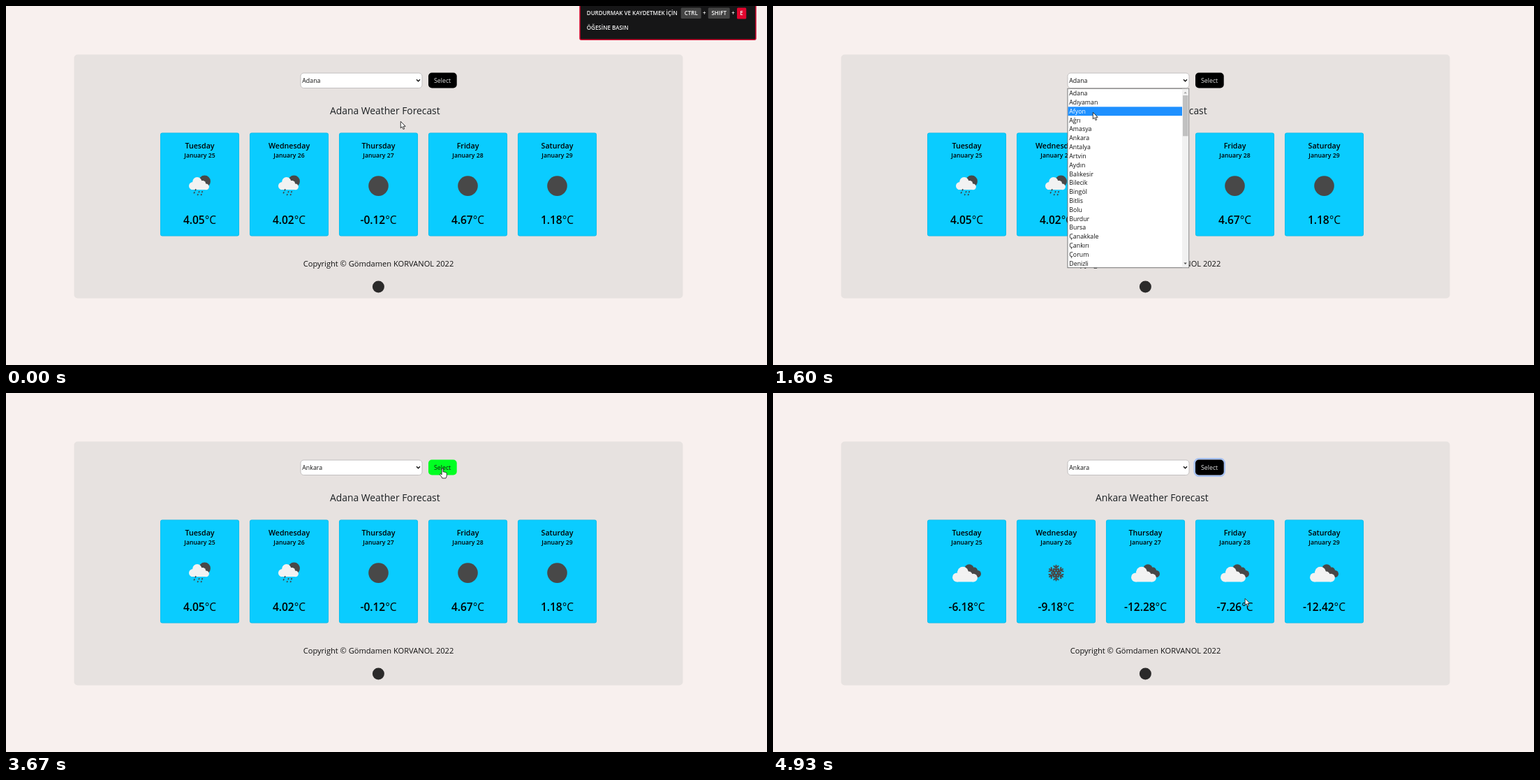
These frames come from a looping animation (1090x514 px, 4990 ms). An HTML page:

```html
<!DOCTYPE html>
<html lang="en">
<head>
<meta charset="utf-8">
<title>Weather Forecast</title>
<style>
  html, body { margin: 0; width: 100%; height: 100%; overflow: hidden; background: #f8f0ee; }
  svg { display: block; width: 1090px; height: 514px; font-family: "Open Sans", "Noto Sans", sans-serif; }
  .mid { text-anchor: middle; }
  .ui { font-size: 8.8px; fill: #111; }
  .heading { font-size: 13.85px; fill: #1c2023; }
  .day { font-size: 10.65px; font-weight: 600; }
  .date { font-size: 8.7px; font-weight: 600; }
  .temp { font-size: 15.5px; font-weight: 600; }
  .temp tspan { font-weight: 400; }
  .footer { font-size: 11.1px; fill: #111; }
  .notice { font-size: 8px; font-weight: 600; fill: #f4f4f4; }
</style>
</head>
<body>
<svg id="stage" viewBox="0 0 1090 514" xmlns="http://www.w3.org/2000/svg">
  <defs>
    <g id="moon"><circle r="14.3" fill="#484848"/></g>
    <g id="rain">
      <circle cx="7" cy="-6.6" r="8.4" fill="#484848"/>
      <g fill="#f2f2f2">
        <circle cx="-10" cy="0" r="5.5"/>
        <circle cx="-3.7" cy="-6" r="6.6"/>
        <circle cx="4" cy="-3" r="4.6"/>
        <circle cx="9" cy="1.2" r="4.4"/>
        <rect x="-13" y="-3" width="22" height="8.5" rx="2"/>
      </g>
      <path d="M-5.5 4.5l-1 2.2M-.5 7.5l-1 2M4 7.5l-1 2M-7.3 8.5l-1 2.2M-2.3 11.5l-.9 2M2.7 11.5l-.9 2" stroke="#3f464a" stroke-width="1.6"/>
    </g>
    <g id="clouds">
      <g fill="#484848">
        <circle cx="3.5" cy="-5.5" r="6.8"/>
        <circle cx="10.7" cy="-3.2" r="4.8"/>
        <circle cx="15.3" cy="1.3" r="5.2"/>
        <rect x="2" y="-4" width="13" height="10.5"/>
      </g>
      <g fill="#f2f2f2">
        <circle cx="-14" cy="6.3" r="6.5"/>
        <circle cx="-5.5" cy="-.8" r="8"/>
        <circle cx="3" cy="3" r="5"/>
        <circle cx="9.6" cy="7" r="5.8"/>
        <rect x="-14" y="2" width="23.6" height="10.8"/>
      </g>
    </g>
    <g id="snow" fill="none" stroke="#484848" stroke-width="1.9" stroke-linecap="round"></g>
  </defs>

  <rect x="97.5" y="69.5" width="872" height="349" rx="5" fill="#e7e2e0"/>

  <rect id="field" x="422" y="96" width="174" height="21.5" rx="4.5" fill="#fff"/>
  <text id="choice" class="ui" x="424.3" y="110.3"></text>
  <path d="M588 105.2l2.5 2.5 2.5-2.5" fill="none" stroke="#111" stroke-width="1.4"/>

  <rect id="ring" x="603.8" y="94.3" width="43" height="24.4" rx="6.2" fill="none" stroke="#a6c1f2" stroke-width="2.5"/>
  <rect id="button" x="605" y="95.5" width="40.7" height="22" rx="5"/>
  <text id="buttonLabel" class="ui mid" x="625.1" y="110">Select</text>

  <text id="heading" class="heading mid" x="542.8" y="154.8"></text>
  <g id="cards"></g>

  <text class="footer mid" x="533.5" y="373">Copyright © Gömdamen KORVANOL 2022</text>
  <circle cx="533.4" cy="402" r="8.5" fill="#2b2a2a"/>

  <g id="list">
    <rect x="422" y="118.2" width="173.7" height="256.5" fill="#fff" stroke="#767676"/>
    <rect id="highlight" x="422.5" width="163.5" height="12.8" fill="#1e90ff"/>
    <g id="options"></g>
    <rect x="586" y="118.7" width="9.2" height="255.5" fill="#f1f1f1"/>
    <rect x="587" y="128" width="7.5" height="58.3" fill="#c1c1c1"/>
    <path d="M588.4 125.2h4.4l-2.2-2.4z" fill="#a3a3a3"/>
    <path d="M588.4 367.5h4.4l-2.2 2.4z" fill="#505050"/>
  </g>

  <g id="notice" class="notice">
    <rect x="822" y="-10" width="252" height="58.3" rx="2" fill="#161617" stroke="#d3082f" stroke-width="1.5"/>
    <text x="831.8" y="13.4">DURDURMAK VE KAYDETMEK İÇİN</text>
    <text x="831.8" y="33.6">ÖĞESİNE BASIN</text>
    <rect x="966.7" y="2.5" width="29" height="15.5" rx="1.5" fill="#444"/>
    <rect x="1005.7" y="2.5" width="31" height="15.5" rx="1.5" fill="#444"/>
    <rect x="1047" y="2.5" width="13.3" height="16" rx="1.5" fill="#e2062f"/>
    <g class="mid">
      <text x="981.2" y="13.4">CTRL</text>
      <text x="1000.4" y="13.4">+</text>
      <text x="1021.2" y="13.4">SHIFT</text>
      <text x="1041.5" y="13.4">+</text>
      <text x="1053.6" y="13.4">E</text>
    </g>
  </g>

  <g id="cursor" fill="#fff" stroke="#222" stroke-width=".9" stroke-linejoin="round">
    <path id="arrow" d="M.3 .2V9.8L2.5 7.8 4.1 11.5 5.7 10.8 4.2 7.2H7.2z"/>
    <path id="hand" d="M-.9 7.5V1Q-.8-.3 .1-.3T1.1 1V5Q2.5 4.4 3.1 5.4 4.4 4.8 4.9 6 6.2 5.6 6.3 7.2V10Q6 12.3 5 14H-.1Q-.7 12-3.4 9.2-4 8.2-3 7.6-2 7.4-.9 9z"/>
  </g>
</svg>
<script>
const LOOP = 4990, STEP = 200 / 3;
const ROW_TOP = 118.7, ROW_HEIGHT = 12.816;
const OPEN = 800, PICK = 2400, BLUR = 2800, HOVER = 3130, PRESS = 3800, LOADED = 3930, LEAVE = 4130;

const cities = ["Adana", "Adıyaman", "Afyon", "Ağrı", "Amasya", "Ankara", "Antalya", "Artvin", "Aydın", "Balıkesir",
  "Bilecik", "Bingöl", "Bitlis", "Bolu", "Burdur", "Bursa", "Çanakkale", "Çankırı", "Çorum", "Denizli"];
const days = ["Tuesday", "Wednesday", "Thursday", "Friday", "Saturday"];
const forecasts = {
  Adana: { icons: ["rain", "rain", "moon", "moon", "moon"], temps: ["4.05", "4.02", "-0.12", "4.67", "1.18"] },
  Ankara: { icons: ["clouds", "snow", "clouds", "clouds", "clouds"], temps: ["-6.18", "-9.18", "-12.28", "-7.26", "-12.42"] }
};

// Pointer path: time, x, y
const path = [
  [0, 565, 165], [200, 560, 170], [400, 520, 165], [530, 481, 150], [600, 472, 124], [670, 469, 108],
  [870, 468, 104.5], [1000, 468, 106], [1130, 466, 112], [1400, 461, 138], [1600, 458, 152], [2000, 455, 178],
  [2130, 455, 187], [2267, 455.3, 183.8], [2400, 463, 180], [2533, 510.3, 163.3], [2670, 560, 153],
  [2870, 600, 130], [3070, 618, 115], [3200, 625, 108], [4070, 625, 108], [4130, 650, 112],
  [4200, 700, 118], [4267, 755.3, 122.3], [4400, 815, 130], [4530, 827, 145], [4670, 826, 155],
  [4730, 810, 175], [4870, 710, 265], [4933, 675.8, 294]
];

const el = Object.fromEntries([...document.querySelectorAll("[id]")].map(n => [n.id, n]));
const clamp = (v, lo, hi) => Math.min(hi, Math.max(lo, v));
const progress = (t, from, to) => clamp((t - from) / (to - from), 0, 1);
const show = (node, on) => node.setAttribute("visibility", on ? "visible" : "hidden");

function place(node, x, y) {
  node.setAttribute("transform", `translate(${x} ${y})`);
}

function pointerAt(t) {
  const i = path.findIndex(p => p[0] > t);
  if (i < 0) return path[path.length - 1].slice(1);
  const [t0, x0, y0] = path[i - 1], [t1, x1, y1] = path[i];
  const k = progress(t, t0, t1);
  return [x0 + (x1 - x0) * k, y0 + (y1 - y0) * k];
}

function cardsFor(city) {
  const { icons, temps } = forecasts[city];
  return days.map((day, i) => `<g transform="translate(${277.5 + i * 128} 0)" class="mid">
    <rect x="-56.5" y="181.5" width="113" height="148" rx="3" fill="#0accff"/>
    <rect x="-56.2" y="181.8" width="112.4" height="147.4" rx="2.7" fill="none" stroke="#000" stroke-opacity=".125" stroke-width=".6"/>
    <text class="day" y="203.7">${day}</text>
    <text class="date" y="217">January ${25 + i}</text>
    <use href="#${icons[i]}" y="257.6"/>
    <text class="temp" y="312">${temps[i]}<tspan>°C</tspan></text>
  </g>`).join("");
}

let shownCity;
function showForecast(city) {
  if (city === shownCity) return;
  shownCity = city;
  el.heading.textContent = `${city} Weather Forecast`;
  el.cards.innerHTML = cardsFor(city);
}

function render(time) {
  const t = Math.floor((time + 3.4) / STEP) * STEP + 1;
  const [x, y] = pointerAt(t);
  const hovering = t >= HOVER && t < LEAVE;
  const open = t >= OPEN && t < PICK;

  show(el.notice, time < 70);
  showForecast(t < LOADED ? "Adana" : "Ankara");
  el.choice.textContent = t < PICK ? "Adana" : "Ankara";

  const focused = t >= PICK && t < BLUR;
  el.field.setAttribute("stroke", focused ? "#000" : "#c2bfbf");
  el.field.setAttribute("stroke-width", focused ? 1.5 : 1);

  show(el.list, open);
  const row = clamp(Math.floor((y - ROW_TOP) / ROW_HEIGHT), 0, cities.length - 1);
  el.highlight.setAttribute("y", ROW_TOP + row * ROW_HEIGHT);
  [...el.options.children].forEach((n, i) => n.style.fill = i === row ? "#fff" : "#111");

  const glow = progress(t, HOVER - STEP, 3330) * (1 - progress(t, LEAVE - STEP, 4260));
  el.button.setAttribute("fill", `rgb(0 ${255 * glow} ${34 * glow})`);
  const ink = 225 - 205 * glow;
  el.buttonLabel.style.fill = `rgb(${ink} ${ink} ${ink})`;
  show(el.ring, t >= PRESS);

  place(el.cursor, x, y);
  show(el.arrow, !hovering);
  show(el.hand, hovering);
}

el.snow.innerHTML = [0, 60, 120, 180, 240, 300].map(a =>
  `<path transform="rotate(${a})" d="M0-2.5V-11M-3.2-9.8L0-7 3.2-9.8M-2.2-1.3L0-2.6 2.2-1.3M-2.8-6L0-3.6 2.8-6"/>`).join("");
el.options.innerHTML = cities.map((c, i) =>
  `<text class="ui" x="424.3" y="${128.2 + i * ROW_HEIGHT}">${c}</text>`).join("");

const start = performance.now();
function tick() {
  render((performance.now() - start) % LOOP);
  requestAnimationFrame(tick);
}
tick();
</script>
</body>
</html>
```
